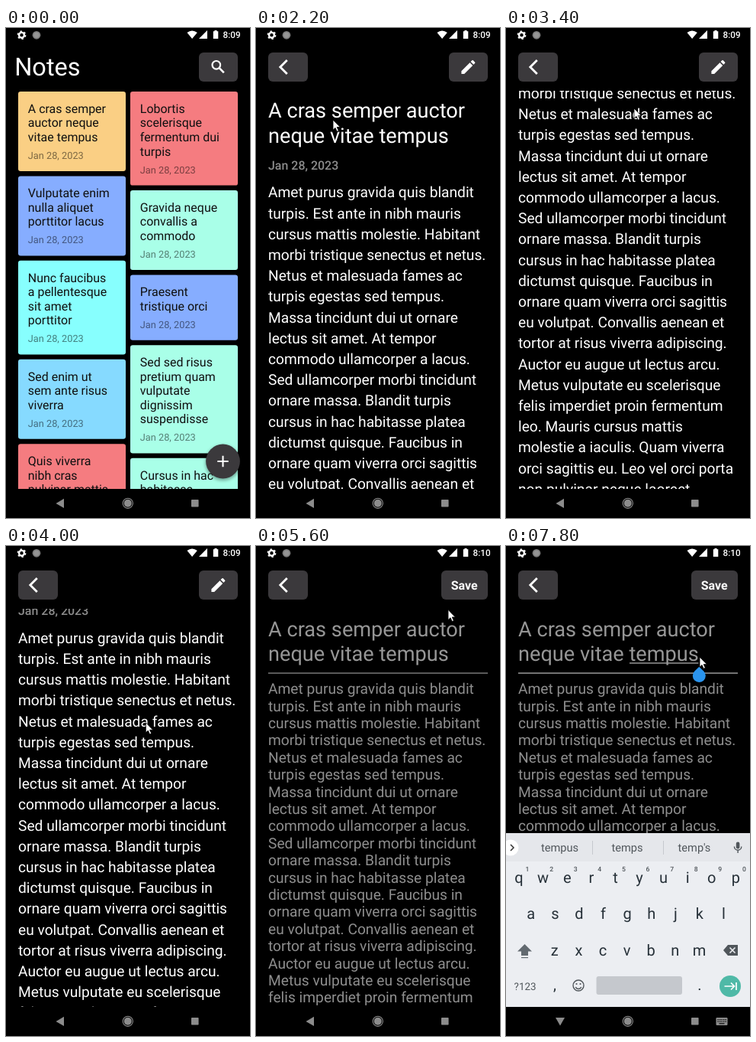
Recreate the animation shown at these times as an HTML page. Size 320x640 px, loop 8000 ms.

```html
<!DOCTYPE html>
<html lang="en">
<head>
<meta charset="utf-8">
<title>Notes</title>
<style>
html, body { margin: 0; width: 100%; height: 100%; overflow: hidden; background: #000; }
svg { display: block; width: 100vw; height: 100vh; font-family: Roboto, sans-serif; }
text { white-space: pre; text-rendering: geometricPrecision; }
</style>
</head>
<body>
<svg id="stage" viewBox="0 0 320 640"></svg>
<script>
const LOOP = 8000, STEP = 200;
const COLORS = { orange: '#facf84', red: '#f57c80', mint: '#a9ffe8', blue: '#86adff', cyan: '#87fffe', sky: '#86daff' };
const BUTTON = '#3b393c';

const LEFT = [
  ['orange', 'A cras semper|auctor neque|vitae tempus'],
  ['blue', 'Vulputate enim|nulla aliquet|porttitor lacus'],
  ['cyan', 'Nunc faucibus|a pellentesque|sit amet|porttitor'],
  ['sky', 'Sed enim ut|sem ante risus|viverra'],
  ['red', 'Quis viverra|nibh cras|pulvinar mattis|nunc'],
  ['orange', 'Amet tellus|cras adipiscing|enim eu']
];
const RIGHT = [
  ['red', 'Lobortis|scelerisque|fermentum dui|turpis'],
  ['mint', 'Gravida neque|convallis a|commodo'],
  ['blue', 'Praesent|tristique orci'],
  ['mint', 'Sed sed risus|pretium quam|vulputate|dignissim|suspendisse'],
  ['mint', 'Cursus in hac|habitasse|platea'],
  ['sky', 'Egestas diam|in arcu cursus|euismod']
];
const TITLE = ['A cras semper auctor', 'neque vitae tempus'];
const BODY = `Amet purus gravida quis blandit
turpis. Est ante in nibh mauris
cursus mattis molestie. Habitant
morbi tristique senectus et netus.
Netus et malesuada fames ac
turpis egestas sed tempus.
Massa tincidunt dui ut ornare
lectus sit amet. At tempor
commodo ullamcorper a lacus.
Sed ullamcorper morbi tincidunt
ornare massa. Blandit turpis
cursus in hac habitasse platea
dictumst quisque. Faucibus in
ornare quam viverra orci sagittis
eu volutpat. Convallis aenean et
tortor at risus viverra adipiscing.
Auctor eu augue ut lectus arcu.
Metus vulputate eu scelerisque
felis imperdiet proin fermentum
leo. Mauris cursus mattis
molestie a iaculis. Quam viverra
orci sagittis eu. Leo vel orci porta
non pulvinar neque laoreet
suspendisse interdum. Libero id
faucibus nisl tincidunt eget.`.split('\n');

// Markup helpers
const text = (s, x, y, size, fill = '#fff', extra = '') =>
  `<text x="${x}" y="${y}" font-size="${size}" fill="${fill}" ${extra}>${s}</text>`;
const mid = (s, x, y, size, fill, weight = 400) =>
  text(s, x, y, size, fill, `text-anchor="middle" font-weight="${weight}"`);
const lines = (list, x, y, pitch, size, fill) =>
  list.map((s, i) => text(s, x, y + i * pitch, size, fill)).join('');
const rect = (x, y, w, h, fill, r = 0, extra = '') =>
  `<rect x="${x}" y="${y}" width="${w}" height="${h}" rx="${r}" fill="${fill}" ${extra}/>`;
const circle = (x, y, r, fill, extra = '') => `<circle cx="${x}" cy="${y}" r="${r}" fill="${fill}" ${extra}/>`;
const path = (d, fill, extra = '') => `<path d="${d}" fill="${fill}" ${extra}/>`;
const stroke = (d, color, w, extra = '') => path(d, 'none', `stroke="${color}" stroke-width="${w}" ${extra}`);
const group = (id, inner, extra = '') => `<g id="${id}" ${extra}>${inner}</g>`;

function column(cards, x) {
  let y = 83, out = '';
  for (const [color, label] of cards) {
    const rows = label.split('|'), h = 48.2 + 18.6 * rows.length;
    out += rect(x, y, 141, h, COLORS[color], 3.2)
      + lines(rows, x + 12.8, y + 27.7, 18.6, 15.96, '#101010')
      + text('Jan 28, 2023', x + 12.8, y + h - 16, 12.77, '#000', 'fill-opacity=".5"');
    y += h + 6.4;
  }
  return out;
}

const page = rect(0, 0, 320, 640, '#000');
const back = rect(16, 32, 52, 38, BUTTON, 6) + stroke('M40.8 42L31.8 51L40.8 60', '#fff', 2.8);

const listPage = page
  + `<g clip-path="url(#view)">${group('cards', column(LEFT, 16) + column(RIGHT, 163))}</g>`
  + text('Notes', 11.2, 62, 32.5)
  + rect(253, 32, 51, 38, BUTTON, 6)
  + circle(275.8, 48.3, 5.3, 'none', 'stroke="#fff" stroke-width="2.2"') + stroke('M279.6 52.2L285.8 58.4', '#fff', 2.6)
  + circle(284.5, 568, 23, '#000', 'opacity=".35" filter="url(#soft)"')
  + circle(284.5, 566, 22.4, BUTTON) + stroke('M277.3 566H291.7M284.5 558.8V573.2', '#fff', 2.1);

const detailPage = page
  + `<g clip-path="url(#view)">` + group('article',
      lines(TITLE, 16, 116.5, 33, 27.16, '#fff')
      + text('Jan 28, 2023', 16, 184.6, 15.96, '#8c8c8c', 'font-weight="500"')
      + lines(BODY, 16, 221.4, 27.2, 19.2, '#fff')) + '</g>'
  + back + rect(253, 32, 51, 38, BUTTON, 6)
  + circle(267, 51, 9, '#464447', 'id="ripple"')
  + path('M3 17.25V21h3.75L17.81 9.94l-3.75-3.75zM20.71 7.04a1 1 0 000-1.41l-2.34-2.34a1 1 0 00-1.41 0l-1.83 1.83 3.75 3.75z',
      '#fff', 'transform="translate(266.4 39)"');

const editPage = page
  + `<g clip-path="url(#editView)">`
  + lines(TITLE, 16, 118, 32, 27.16, '#969696')
  + rect(162, 152.2, 90.4, 1.5, '#969696', 0, 'id="compose"')
  + rect(16, 165.4, 288, 1.3, '#8a8a8a', 0, 'id="rule"')
  + lines(BODY, 16, 193.2, 22.4, 19.2, '#8e8e8e') + '</g>'
  + back + rect(243, 32, 61, 38, BUTTON, 6)
  + mid('Save', 273.2, 56.7, 15.96, '#fff', 600)
  + rect(223.8, 125, 1.6, 25, '#fff', 0, 'id="caret"')
  + path('M0 -11.5L6 -5.9A8.5 8.5 0 1 1 -6 -5.9Z', '#2a94ee', 'id="handle"');

function keyboard() {
  const ink = '#263038', gray = '#50565b';
  const row = (keys, x, y) => [...keys].map((k, i) => mid(k, x + i * 31.6, y, 20, ink)).join('');
  const digits = [...'1234567890'].map((d, i) => mid(d, 28 + i * 31.6, 425.3, 8.6, gray, 500)).join('');
  return rect(0, 375, 320, 265, '#eceef2') + rect(0, 375, 320, 37, '#e5e7eb')
    + circle(6, 394, 10.5, '#fff') + stroke('M6 390L10 394L6 398', '#333', 1.5)
    + mid('tempus', 70.5, 398.7, 14.6, gray) + mid('temps', 159, 398.7, 14.6, gray) + mid("temp's", 247, 398.7, 14.6, gray)
    + stroke('M113.5 385V403M206.5 385V403', '#c6c9ce', 1)
    + rect(301.8, 386.5, 4.6, 9, gray, 2.3) + stroke('M299.4 392.5a4.7 4.7 0 0 0 9.4 0M304.1 397.5V401', gray, 1.4)
    + row('qwertyuiop', 17, 439.6) + digits + row('asdfghjkl', 32.7, 486.6) + row('zxcvbnm', 63.8, 534.5)
    + path('M24.5 520L34 529.5H29V535H20V529.5H15Z', '#626a70') + rect(20, 537, 9, 1.2, '#626a70')
    + path('M285 528L291 521H304V535H291Z', gray) + stroke('M293.5 524.5L300.5 531.5M300.5 524.5L293.5 531.5', '#eceef2', 1.6)
    + mid('?123', 25, 579.5, 13.4, gray) + mid(',', 64, 580, 20, ink) + mid('.', 254, 580, 20, ink)
    + circle(95, 574, 7, 'none', `stroke="${gray}" stroke-width="1.4"`)
    + circle(92.5, 572, 1.1, gray) + circle(97.5, 572, 1.1, gray) + stroke('M91.3 576a4 4 0 0 0 7.4 0', gray, 1.3)
    + rect(118.5, 562, 112.5, 24, '#c5c8cd', 3)
    + circle(294, 575, 14, '#4fb9a7') + stroke('M286.5 575H299M295 570.5L299.5 575L295 579.5M302 570V580', '#fff', 1.7);
}

const statusBar = circle(20.5, 9.3, 3.4, 'none', 'stroke="#fff" stroke-width="2.4"')
  + circle(20.5, 9.3, 5, 'none', 'stroke="#fff" stroke-width="1.8" stroke-dasharray="2.4 2.84"')
  + circle(40, 9.3, 5.4, '#777') + circle(40, 9.3, 3.8, '#949494')
  + path('M237.5 6Q244 .8 250.8 6L244.1 14Z', '#fff') + path('M264 3V14H253Z', '#fff')
  + path('M273.5 3H276.5V4.2H278.3V14H271.8V4.2H273.5Z', '#fff')
  + text('8:09', 284.5, 13.3, 11.7, '#fff', 'id="clock" font-weight="500"');

const navIcons = group('navIcons',
  path('M76 614.8V627L65.5 620.9Z', 'currentColor', 'id="backKey"')
  + path('M65 616H77L71 626.5Z', 'currentColor', 'id="downKey"')
  + circle(159.8, 620.8, 6.6, 'none', 'stroke="currentColor" stroke-width="1.1"') + circle(159.8, 620.8, 5, 'currentColor')
  + rect(243, 616, 9.6, 9.6, 'currentColor', .8)
  + group('imeKey', rect(275.5, 616, 15, 10, 'currentColor', 1.2)
    + stroke('M277.5 618.7H289M277.5 621.2H289', '#000', 1.2, 'stroke-dasharray="1.3 1.2"')
    + stroke('M279.5 623.8H286.5', '#000', 1.1)));

document.getElementById('stage').innerHTML =
  `<defs><clipPath id="view">${rect(0, 82, 320, 520)}</clipPath>
   <clipPath id="editView">${rect(0, 82, 320, 520, '#000', 0, 'id="editBox"')}</clipPath>
   <filter id="soft"><feGaussianBlur stdDeviation="2"/></filter></defs>`
  + page + group('list', listPage) + group('detail', detailPage) + group('edit', editPage)
  + rect(0, 602, 320, 38, '#000') + group('keys', keyboard())
  + rect(0, 602, 320, 38, '#000', 0, 'id="navBack"') + navIcons + statusBar
  + path('M0 0V13.2L3 10.4L5.2 15.2L7.4 14.2L5.2 9.6H9.4Z', '#fff', 'id="mouse" stroke="#000" stroke-width=".8"');

const $ = Object.fromEntries([...document.querySelectorAll('#stage [id]')].map(el => [el.id, el]));
const set = (el, attrs) => { for (const k in attrs) el.setAttribute(k, attrs[k]); };
const show = (el, on) => { el.style.display = on ? '' : 'none'; };

// Keyframes are [time, ...values], blended linearly
function track(keys, t) {
  const i = keys.findIndex(k => k[0] > t);
  if (i < 0) return keys[keys.length - 1].slice(1);
  if (i === 0) return keys[0].slice(1);
  const a = keys[i - 1], b = keys[i], p = (t - a[0]) / (b[0] - a[0]);
  return a.slice(1).map((v, j) => v + (b[j + 1] - v) * p);
}

const MOUSE = [
  [200, 190, 430], [400, 185, 330], [800, 170, 430], [1000, 155, 190], [1200, 140, 30], [1400, 115, 90],
  [1600, 101, 120], [2200, 101, 120], [2600, 160, 300], [3400, 168, 105], [3600, 170, 92],
  [4200, 190, 300], [4400, 200, 320], [4800, 270, 60], [5000, 269, 53], [5400, 268, 54],
  [6000, 220, 142], [6400, 219, 142], [7000, 100, 500], [7200, 91, 519], [7400, 170, 330], [7600, 250, 150], [7800, 254, 145]
];
const LIST_SCROLL = [[0, 0], [200, 45], [400, 130], [600, 110], [800, 40], [1000, 0]];
const READ_SCROLL = [[2400, 0], [2600, 12], [3400, 211], [3600, 224], [4200, 30], [4400, 0]];
const OPEN = [[1600, 0], [1800, .35], [2000, .9], [2200, 1]];
const EDIT = [[5000, 0], [5200, .4], [5400, 1]];

function zoom(el, scale, opacity) {
  show(el, opacity > 0);
  set(el, { transform: `translate(160 320) scale(${scale}) translate(-160 -320)`, opacity });
}

function draw(t) {
  const [open] = track(OPEN, t), [edit] = track(EDIT, t);
  zoom($.list, 1 + .03 * open, open < 1 ? 1 : 0);
  zoom($.detail, .85 + .15 * open, Math.min(1, open * 1.6));
  zoom($.edit, .85 + .15 * edit, Math.min(1, edit * 1.6));
  set($.cards, { transform: `translate(0 ${-track(LIST_SCROLL, t)[0]})` });
  set($.article, { transform: `translate(0 ${-track(READ_SCROLL, t)[0]})` });
  show($.ripple, t >= 5000);

  const typing = t >= 6400, settled = t >= 6600, atEnd = t >= 7600;
  set($.editBox, { height: typing ? 294 : 520 });
  show($.compose, typing);
  set($.rule, { fill: settled ? '#b0b0b0' : '#8a8a8a' });
  show($.caret, t >= 6200 && t % 1000 < 600 && !atEnd);
  show($.handle, settled);
  set($.handle, { transform: `translate(${atEnd ? 253.3 : 224.6} 169.3)` });

  show($.keys, typing);
  set($.keys, { transform: `translate(0 ${settled ? 0 : 38})`, opacity: settled ? 1 : .62 });
  show($.navBack, settled);
  $.navIcons.style.color = typing && !settled ? '#d8d8d8' : '#8c8c8c';
  show($.backKey, !typing);
  show($.downKey, typing);
  show($.imeKey, typing);

  $.clock.textContent = t < 4200 ? '8:09' : '8:10';
  show($.mouse, t >= 200);
  set($.mouse, { transform: `translate(${track(MOUSE, t).join(' ')})` });
}

const start = performance.now();
function tick() {
  const t = (performance.now() - start) % LOOP;
  draw(Math.floor(t / STEP) * STEP);
  requestAnimationFrame(tick);
}
tick();
</script>
</body>
</html>
```
